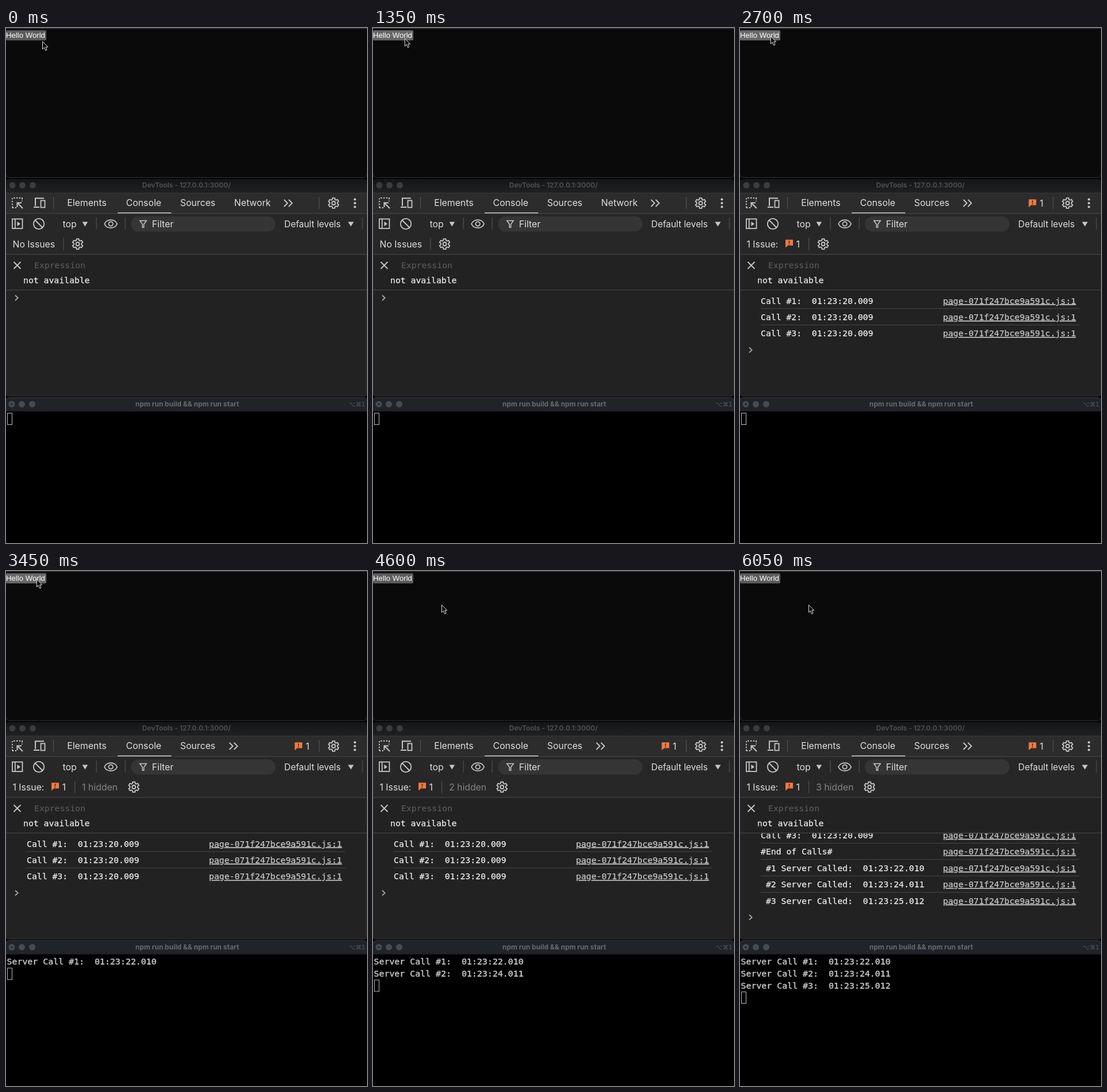
Animation of 627x894 px, one loop 6.55 s. Source, as an HTML page:

```html
<!DOCTYPE html>
<html lang="en">
<head>
<meta charset="utf-8">
<title>Server calls</title>
<style>
  html, body { margin: 0; width: 100%; height: 100%; overflow: hidden; background: #000; }
  svg { display: block; }
  text { font: 15.8px Inter, Roboto, sans-serif; fill: #dedede; white-space: pre; }
  .mono { font: 14.76px "DejaVu Sans Mono", monospace; fill: #ececec; stroke: #ececec; stroke-width: .25; }
  .link { fill: #c6c6c6; stroke: #c6c6c6; text-decoration: underline 1px; text-underline-offset: 2px; }
  .term { font-size: 14.9px; fill: #cbcbcb; stroke: #cbcbcb; stroke-width: .4; }
  .faint { fill: #606060; stroke: none; }
  .title { font-weight: 700; font-size: 11.9px; fill: #686a6c; text-anchor: middle; }
  .dim { fill: #858585; }
  .icon { fill: none; stroke: #c7c7c7; stroke-width: 1.8; }
  .sep { stroke: #505050; stroke-width: 1.2; }
  .solid { fill: #c7c7c7; stroke: none; }
</style>
</head>
<body>
<svg width="627" height="894" viewBox="0 0 627 894">
  <defs>
    <g id="gear" class="icon"><path id="teeth" stroke-linejoin="round"/><circle r="3"/></g>
    <path id="more" class="icon" d="M-7-6l6 6-6 6M1-6l6 6-6 6"/>
    <g id="flag">
      <path d="M-6.5-6.5h13v10h-9l-4 4z" fill="#f5793f"/>
      <path d="M0-4.5v3.8M0 .6v1.6" stroke="#2a2a2a" stroke-width="1.7"/>
    </g>
    <linearGradient id="bar" x2="0" y2="1">
      <stop stop-color="#141516"/><stop offset="1" stop-color="#202122"/>
    </linearGradient>
    <clipPath id="view"><path d="M0 455.5h627v183H0z"/></clipPath>
  </defs>

  <!-- Page -->
  <rect width="627" height="894" fill="#050505"/>
  <path d="M0 0h627v253q0 6-6 6H6q-6 0-6-6z" fill="#0a0a0a"/>
  <path d="M0 253q0 6.5 6 6.5h615q6 0 6-6.5" fill="none" stroke="#303030"/>
  <path d="M0 .8h627" stroke="#303030" stroke-width="1.6"/>
  <rect id="button" y="4" width="70" height="17.5" rx="2"/>
  <text x="0" y="17.3" style="font:13.2px 'Liberation Sans',Arial,sans-serif;fill:#fff">Hello World</text>

  <!-- Developer tools -->
  <path d="M0 280h627v353q0 6-6 6H6q-6 0-6-6z" fill="#222" stroke="#373737"/>
  <path d="M0 287v-19q0-6 6-6h615q6 0 6 6v19z" fill="url(#bar)"/>
  <g fill="#3b3c3d"><circle cx="11" cy="273" r="5.5"/><circle cx="28.5" cy="273" r="5.5"/><circle cx="46.5" cy="273" r="5.5"/></g>
  <text class="title" x="313.5" y="277" style="fill:#4c4d4e">DevTools - 127.0.0.1:3000/</text>
  <path d="M0 287h627v35H0z" fill="#2c2c2c"/>
  <path d="M0 322h627v71H0z" fill="#272727"/>
  <path d="M0 286.5h627" stroke="#383838"/>
  <path d="M0 322h627M0 393h627M0 454.8h627" stroke="#4a4a4a"/>
  <path d="M194 321h93" stroke="#a9a9a9" stroke-width="2"/>
  <path class="sep" d="M82.5 293v21M544 293v21M157 329v21M207 329v21M619 329v21"/>
  <text x="106.3" y="309">Elements</text>
  <text x="208.5" y="309">Console</text>
  <text x="302.5" y="309">Sources</text>
  <text id="network" x="396.3" y="309">Network</text>
  <use id="chevrons" href="#more"/>
  <g id="badge"><use href="#flag" x="508" y="304"/><text x="520.5" y="310">1</text></g>
  <use href="#gear" x="569" y="304"/>
  <g class="solid"><circle cx="606" cy="297.5" r="2.1"/><circle cx="606" cy="304" r="2.1"/><circle cx="606" cy="310.5" r="2.1"/></g>

  <g class="icon">
    <path d="M11 312v-17h18" stroke-dasharray="2.4 2.4"/>
    <path d="M28 295v6M11 312h7" stroke-dasharray="2.4 2.4"/>
    <path d="M29 313l-9-9M19.5 311v-7.5h7.5" stroke-width="2"/>
    <path d="M51 309v-13.5h15M48 311h10" stroke-width="2"/>
    <rect x="60.5" y="299.5" width="7" height="12"/>
    <rect x="11" y="331.5" width="17.5" height="16.5"/>
    <path d="M15.8 331v17"/>
    <path d="M19.5 336l5.5 4-5.5 4z" class="solid"/>
    <circle cx="57" cy="340" r="9.2"/><path d="M50.5 333.5l13 13"/>
    <path d="M171 340c4-9.3 18-9.3 22 0c-4 9.3-18 9.3-22 0z"/><circle cx="182" cy="340" r="3.7"/>
  </g>
  <rect x="217" y="327" width="251" height="26.5" rx="13.2" fill="#353535"/>
  <path class="icon" d="M232.5 334.5h11.5l-4.5 6v5.5h-2.5v-5.5z" style="stroke-width:1.5"/>
  <text x="98.5" y="345.8">top</text>
  <text x="253.5" y="345.8">Filter</text>
  <text x="483.3" y="345.8" style="font-size:15.4px">Default levels</text>
  <path class="solid" d="M132.5 336.5h9.5l-4.75 8zM594 336.5h10l-5 8z"/>

  <text id="issues" x="11.5" y="381"></text>
  <g id="issueCount"><use href="#flag" x="85.5" y="374"/><text x="97.5" y="381">1</text></g>
  <path id="issueSep" class="sep" d="M0 364.5v21"/>
  <text id="hidden" class="dim" x="132" y="381"></text>
  <use id="settings" href="#gear"/>

  <path class="icon" d="M13.5 406l12 12M25.5 406l-12 12"/>
  <text class="mono faint" x="49" y="416.5">Expression</text>
  <text class="mono" x="30" y="442.5">not available</text>
  <g clip-path="url(#view)"><g id="log"></g></g>
  <rect id="scrollbar" x="619.8" y="509" width="6.4" height="129" rx="3.2" fill="#909090"/>

  <!-- Terminal -->
  <path d="M0 665h627v229H0z"/>
  <path d="M0 665.5v-18q0-6 6-6h615q6 0 6 6v18z" fill="#202428"/>
  <path d="M0 648q0-6.5 6-6.5h615q6 0 6 6.5" fill="none" stroke="#37393b"/>
  <g fill="#484b4e"><circle cx="10" cy="653" r="5.5"/><circle cx="27.5" cy="653" r="5.5"/><circle cx="45.5" cy="653" r="5.5"/></g>
  <circle cx="10" cy="653" r="1.8" fill="#202427"/>
  <text class="title" x="314.8" y="657">npm run build &amp;&amp; npm run start</text>
  <text x="624" y="656.5" text-anchor="end" style="font:10.3px 'DejaVu Sans',sans-serif;fill:#55595b">⌥⌘1</text>
  <g id="terminal"></g>
  <rect id="caret" x="2.5" y="668.5" width="8" height="20" fill="none" stroke="#bdbdbd"/>

  <path id="pointer" d="M0 0v13.2l3-2.8 2.2 5.2 2.4-1.1-2.2-5h4z" fill="#080808" stroke="#e4e4e4" stroke-linejoin="round"/>
</svg>
<script>
const LOOP = 6550, STEP = 50;
const CALLS = 1850, BADGE = 2000, SERVER = [3000, 4000, 5000];
const ROW = 28.43, LINE = 20.7, SCROLL = 71.4;
const stamps = ['01:23:22.010', '01:23:24.011', '01:23:25.012'];
const messages = [
  ...[1, 2, 3].map(n => `Call #${n}:  01:23:20.009`),
  '#End of Calls#',
  ...stamps.map((s, i) => ` #${i + 1} Server Called:  ${s}`)
];
// time, x, y of the pointer tip
const path = [[0, 63.5, 23.5], [250, 60.5, 20], [450, 60.5, 20], [650, 56, 16.5], [900, 56, 16.5],
  [1350, 55.2, 18.3], [1500, 55.2, 18.3], [1850, 53.3, 14.5], [3850, 53.3, 14.5], [4500, 119.3, 58.8]];

const $ = id => document.getElementById(id);
const show = (id, on) => $(id).style.display = on ? '' : 'none';
const move = (id, x, y) => $(id).setAttribute('transform', `translate(${x} ${y})`);
const setHTML = (id, html) => { if ($(id).shown !== html) $(id).innerHTML = $(id).shown = html; };

const teeth = [];
for (let k = 0; k < 6; k++)
  for (const [r, a] of [[6.8, -20], [9.2, -13], [9.2, 13], [6.8, 20]]) {
    const angle = (k * 60 + 30 + a) * Math.PI / 180;
    teeth.push(`${(r * Math.cos(angle)).toFixed(2)} ${(r * Math.sin(angle)).toFixed(2)}`);
  }
$('teeth').setAttribute('d', `M${teeth.join('L')}Z`);

function pointerAt(t) {
  const i = path.findIndex(p => p[0] > t);
  if (i < 0) return path.at(-1).slice(1);
  const [t0, x0, y0] = path[i - 1], [t1, x1, y1] = path[i];
  const p = 1 - (1 - (t - t0) / (t1 - t0)) ** 2;
  return [x0 + (x1 - x0) * p, y0 + (y1 - y0) * p];
}

function logRows(count) {
  let html = '';
  for (let i = 0; i < count; i++) {
    const y = 478.5 + i * ROW;
    html += `<text class="mono" x="36" y="${y}">${messages[i]}</text>
      <text class="mono link" x="352.5" y="${y}">page-071f247bce9a591c.js:1</text>`;
    if (i < count - 1) html += `<path d="M36 ${y + 8.5}h553" stroke="#484848"/>`;
  }
  const y = count ? 473.6 + count * ROW : 468.5;
  return html + `<path class="icon" style="stroke:#a8a8a8" d="M16 ${y - 4.5}l4.7 4.5-4.7 4.5"/>`;
}

function draw(now) {
  const t = Math.floor(now % LOOP / STEP) * STEP;
  const called = t >= CALLS, badge = t >= BADGE;
  const served = SERVER.filter(s => t >= s).length;
  const done = served === 3;

  const [x, y] = pointerAt(t);
  move('pointer', x, y);
  $('button').setAttribute('fill', x < 70 && y < 21 ? '#686868' : '#5c5c5c');

  show('network', !badge);
  show('badge', badge);
  move('chevrons', badge ? 395 : 490, 304);

  $('issues').textContent = called ? '1 Issue:' : 'No Issues';
  show('issueCount', called);
  move('issueSep', called ? 119.5 : 100, 0);
  $('hidden').textContent = served ? `${served} hidden` : '';
  move('settings', served ? [222, 224, 225][served - 1] : called ? 144.5 : 124.5, 375);

  setHTML('log', logRows(done ? 7 : called ? 3 : 0));
  move('log', 0, done ? -SCROLL : 0);
  const fade = Math.min(1, Math.max(0, (t - 5500) / 200));
  $('scrollbar').style.opacity = done ? 1 - fade : 0;

  setHTML('terminal', stamps.slice(0, served).map((s, i) =>
    `<text class="mono term" x="1.5" y="${683.4 + i * LINE}">Server Call #${i + 1}:  ${s}</text>`).join(''));
  move('caret', 0, served * LINE);
}

function tick() {
  draw(performance.now());
  requestAnimationFrame(tick);
}
tick();
</script>
</body>
</html>
```
